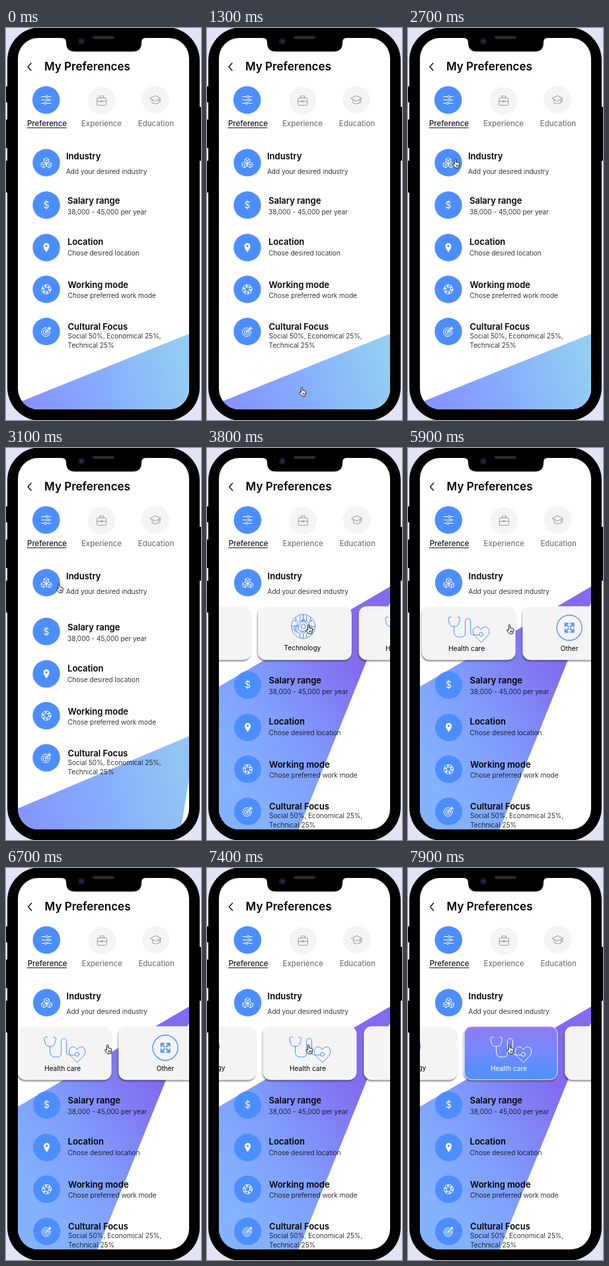
These frames come from a looping animation (295 by 591 pixels, 8 s). An HTML page:

```html
<!DOCTYPE html>
<html lang="en">
<head>
<meta charset="utf-8">
<title>My Preferences</title>
<style>
  html, body { margin: 0; width: 100%; height: 100%; overflow: hidden; background: #e2e3f4; }
  svg { display: block; width: 295px; height: 591px; font-family: Inter, "Open Sans", sans-serif; }
  .line { fill: none; stroke-linecap: round; stroke-linejoin: round; }
  .title { font-size: 17px; font-weight: 600; }
  .tab { font-size: 11.4px; font-weight: 500; text-anchor: middle; fill: #77777b; }
  .head { font-size: 13px; font-weight: 600; }
  .sub { font-size: 10.2px; font-weight: 300; fill: #000; }
  .label { font-size: 10.1px; text-anchor: middle; stroke: none; }
</style>
</head>
<body>
<svg viewBox="0 0 295 591">
  <defs>
    <linearGradient id="low" gradientUnits="userSpaceOnUse" x1="25" y1="575" x2="270" y2="500">
      <stop stop-color="#8490ff"/><stop offset=".55" stop-color="#87b1fc"/><stop offset="1" stop-color="#94cdf3"/>
    </linearGradient>
    <linearGradient id="high" gradientUnits="userSpaceOnUse" x1="20" y1="470" x2="235" y2="330">
      <stop stop-color="#84b2ff"/><stop offset=".45" stop-color="#7f9cfc"/><stop offset="1" stop-color="#836aef"/>
    </linearGradient>
    <linearGradient id="chosen" x2="0" y2="1">
      <stop stop-color="#8d7df4"/><stop offset=".5" stop-color="#7289fa"/><stop offset=".85" stop-color="#5490ff"/>
    </linearGradient>
    <filter id="shadow" x="-10%" y="-10%" width="120%" height="130%">
      <feDropShadow dx="-.7" dy="2" stdDeviation=".8" flood-color="#222" flood-opacity=".6"/>
    </filter>
    <clipPath id="screen"><rect x="18" y="15" width="259" height="560" rx="31"/></clipPath>
  </defs>

  <path d="M0 88h5v24H0zM0 138h5v43H0zM0 200h5v48H0zM290 119h5v81h-5z"/>
  <rect x="2" y="-1" width="291" height="593" rx="50"/>
  <g clip-path="url(#screen)">
    <path fill="#fff" d="M0 0h295v591H0z"/>
    <polygon class="wedge" fill="url(#low)"/>
    <polygon class="wedge" id="wedgeHigh" fill="url(#high)"/>
    <g id="cards"></g>
    <g id="header"></g>
    <g id="rows"></g>
  </g>
  <path d="M84 12H211V15Q205 15 205 22Q205 35.500 192 35.500H104Q91 35.500 91 22Q91 15 84 15z"/>
  <rect x="131" y="12" width="33" height="4.5" rx="2.2" fill="#2b2b2d"/>
  <circle cx="114" cy="20" r="5" fill="#191a2b"/><circle cx="114" cy="20" r="2" fill="#2c3158"/>
  <path id="hand" fill="#fff" stroke="#111" stroke-linejoin="round"
    d="M3.4 8.4V1.7Q3.4.5 4.5.5T5.6 1.7V5.2L9.5 6.1Q11 6.5 10.8 8L10.2 11.6 9.5 14H4.7L.8 9.4Q.3 8 1.6 7.9zM6.2 9v3M8.2 9v3"/>
</svg>
<script>
const BLUE = '#4d8eff', GREY = '#f4f4f4';
const $ = id => document.getElementById(id);
const text = (cls, x, y, s, extra = '') => `<text class="${cls}" x="${x}" y="${y}" ${extra}>${s}</text>`;
const disc = (x, y, r, fill) => `<circle cx="${x}" cy="${y}" r="${r}" fill="${fill}"/>`;
const ring = (x, y, r) => `<circle cx="${x}" cy="${y}" r="${r}"/>`;
const stroke = (d, color = 'currentColor', width = 1) =>
  `<path class="line" d="${d}" stroke="${color}" stroke-width="${width}"/>`;
const group = (x, y, inner, color = '#fff') =>
  `<g class="line" transform="translate(${x} ${y})" stroke="${color}" color="${color}">${inner}</g>`;

// Icons are drawn around their own centre.
const cube = (x, y) => stroke(`M${x} ${y - 4}l3.6 2v4l-3.6 2-3.6-2v-4zm-3.6 2l3.6 2 3.6-2m-3.6 2v4`, '#fff', .9);
const icons = {
  sliders: stroke('M-7-5H-1M3-5H7M-7 0H1M5 0H7M-7 5H-3M1 5H7', '#fff', 1.2) + ring(1, -5, 1.7) + ring(3, 0, 1.7) + ring(-1, 5, 1.7),
  bag: '<rect x="-7" y="-4" width="14" height="11" rx="1.5"/>' + stroke('M-3-4V-7H3V-4M-7 1H-1M1 1H7M-1 0H1V2H-1z'),
  cap: stroke('M-8-2L0-6 8-2 0 2zM-5 0V5Q0 8 5 5V0M7-1V4'),
  cubes: cube(0, -3) + cube(-4.2, 3.5) + cube(4.2, 3.5),
  dollar: text('', 0, 5, '$', 'text-anchor="middle" font-size="14" fill="#fff" stroke="none"'),
  pin: '<path fill="#fff" stroke="none" fill-rule="evenodd" d="M0 7C-3 3-4.5 0-4.5-2.3A4.5 4.5 0 0 1 4.5-2.3C4.5 0 3 3 0 7zM0-4A1.7 1.7 0 0 0 0-.6 1.7 1.7 0 0 0 0-4"/>',
  buoy: ring(0, 0, 7) + ring(0, 0, 3.6) + '<circle r="5.3" stroke-width="2.2" stroke-dasharray="2.2 3.35" stroke-linecap="butt"/>',
  target: ring(-1, 1, 6.5) + ring(-1, 1, 3.7) + ring(-1, 1, 1) + stroke('M-1 1L6-6M4-7V-4H7', '#fff', 1.1)
};

const tab = (x, y, icon, label, tx, on) => disc(x, y, 20.8, on ? BLUE : GREY) +
  group(x, y, icons[icon], on ? '#fff' : '#999') + text('tab', tx, 148, label, on ? 'style="fill:#16142c"' : '');
const row = (y, icon, x, headY, title, ...subs) => disc(61, y, 20.7, BLUE) + group(61, y, icons[icon]) +
  text('head', x, headY, title) + subs.map(([sy, s]) => text('sub', x, sy, s)).join('');

$('header').innerHTML = stroke('M38 53L33 58.500 38 64', '#000', 1.3) + text('title', 58, 64, 'My Preferences') +
  tab(60.7, 108.5, 'sliders', 'Preference', 62, true) + tab(144.7, 109.5, 'bag', 'Experience', 144.5) +
  tab(226, 108, 'cap', 'Education', 227) + stroke('M32 150.500H91', '#16142c') +
  row(203, 'cubes', 91, 198, 'Industry', [220, 'Add your desired industry']);
$('rows').innerHTML =
  row(267, 'dollar', 93, 265, 'Salary range', [281, '38,000 - 45,000 per year']) +
  row(331, 'pin', 93, 327, 'Location', [343, 'Chose desired location']) +
  row(394, 'buoy', 93.5, 392, 'Working mode', [407, 'Chose preferred work mode']) +
  row(457.5, 'target', 93.5, 455, 'Cultural Focus', [468, 'Social 50%, Economical 25%,'], [482, 'Technical 25%']);

// One half of the circuit, mirrored to make the other.
const circuit = stroke('M0-18V-11M5-16V-9L9-5V-2M11-13V-10M3-7L7-2V3M18 0H13M3 7L8 4H12M5 16V11L10 8M0 18V11') +
  [[0, -9.5], [11, -8.5], [9, -.5], [2, -8], [11.5, 0], [13.5, 4], [11, 7], [2, 8]].map(p => ring(...p, 1.5)).join('');
const techIcon = group(68.7, 30, ring(0, 0, 18) + ring(0, 0, 3.5) + circuit + `<g transform="scale(-1 1)">${circuit}</g>`, BLUE);
const careIcon = stroke('M45 16H42Q40 16 40.500 19L42 26Q43 30 49 30T56 26L58 19Q58.500 16 56 16H54' +
  'M49 30V38Q49 46 57 46H60Q66 46 66 40V23Q66 18 70 18T74 23V38Q74 43 79 43H87' +
  'M90 54L80 44Q75 37 80 32 86 28 90 35 94 28 100 32 105 37 100 44z') + '<circle class="line" cx="90" cy="42" r="3" stroke="currentColor"/>';
const arrow = a => `<path class="line" transform="rotate(${a})" d="M1.500 1.500L6.500 6.500M6.500 2V6.500H2" stroke-width="1.8"/>`;
const otherIcon = group(71, 32, '<circle r="19" stroke-width="1.4"/>' + [0, 90, 180, 270].map(arrow).join(''), BLUE);

const SPACING = 152.5;
const face = fill => `<rect x=".7" width="140.800" height="80" rx="11" fill="${fill}" stroke="#fff" stroke-width=".7"/>`;
const card = (i, inner) => `<g transform="translate(${i * SPACING} 0)"><g filter="url(#shadow)">${face(GREY)}</g>${inner}</g>`;
const care = color => `<g color="${color}">${careIcon}</g>`;
$('cards').innerHTML = card(-2, '') + card(-1, techIcon + text('label', 67.5, 66, 'Technology')) +
  card(0, care(BLUE) + text('label', 68, 67, 'Health care') +
    `<g id="picked">${face('url(#chosen)')}${care('#fff')}${text('label', 68, 67, 'Health care', 'fill="#fff"')}</g>`) +
  card(1, otherIcon + text('label', 71, 67, 'Other')) + card(2, '');

const mix = (a, b, p) => a + (b - a) * p;
const part = (t, from, to) => Math.min(1, Math.max(0, (t - from) / (to - from)));
const ease = p => p * p * (3 - 2 * p);
const span = (t, from, to) => ease(part(t, from, to));

const closed = [18, 565, 277, 461, 277, 530, 277, 591, 18, 591];
const open = [18, 360, 277, 209, 277, 233, 132, 591, 18, 591];

function draw(t) {
  const p = span(t, 2950, 3700);
  const points = closed.map((v, i) => mix(v, open[i], p)).join(' ');
  document.querySelectorAll('.wedge').forEach(w => w.setAttribute('points', points));
  $('wedgeHigh').setAttribute('opacity', p);
  $('header').setAttribute('transform', `translate(${.6 * p} 0)`);
  $('rows').setAttribute('transform', `translate(${.6 * p} ${90.3 * p})`);

  // The strip is dragged left at a steady pace, then back to the chosen card.
  const strip = mix(mix(229.5, -19, part(t, 3800, 6300)), 84.5, span(t, 6300, 7300));
  $('cards').setAttribute('transform', `translate(${strip} 239)`);
  $('cards').setAttribute('opacity', part(p, .25, 1));
  $('picked').setAttribute('opacity', span(t, 7420, 7750));

  const enter = span(t, 900, 2650);
  const x = mix(mix(150, 67, enter), 149, p), y = mix(mix(594, 197, enter), 266, p);
  $('hand').setAttribute('transform', `translate(${x} ${y})`);
}

const start = performance.now();
(function tick() {
  draw((performance.now() - start) % 8000);
  requestAnimationFrame(tick);
})();
</script>
</body>
</html>
```
